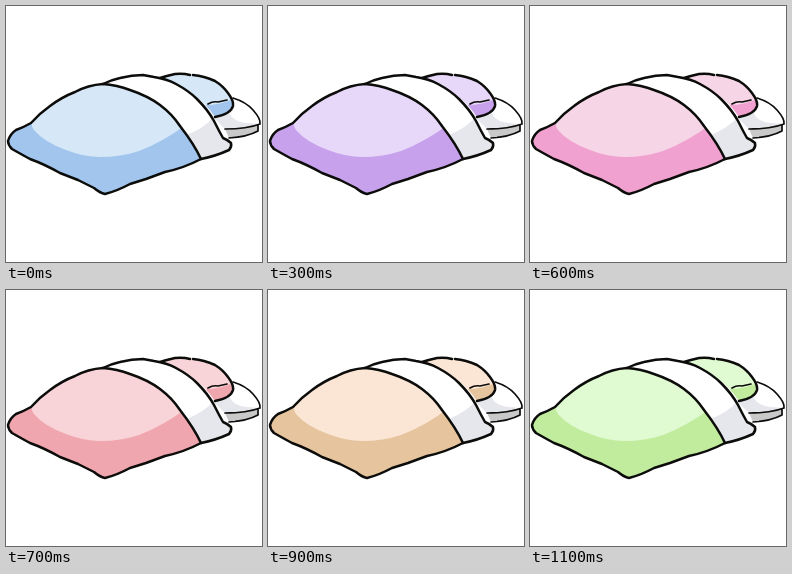
Animation of 256 by 256 pixels, one loop 1.2 s. Source, as an HTML page:

```html
<!DOCTYPE html>
<html lang="en">
<head>
<meta charset="utf-8">
<title>Colour-changing bedding</title>
<style>
html, body { margin: 0; width: 100%; height: 100%; overflow: hidden; background: #fff }
svg { display: block; width: 100%; height: 100% }
.light { fill: var(--light) }
.dark { fill: var(--dark) }
.shade { fill: #e6e7ed }
.ink { fill: none; stroke: #0c0c0a; stroke-width: 2.5; stroke-linecap: round; stroke-linejoin: round }
.thin { stroke-width: 1.7 }
</style>
</head>
<body>
<svg viewBox="0 0 256 256">
  <defs>
    <path id="quilt" d="M2 135Q4 128 10 124Q18 121 25 117Q34 107 44 100Q56 91 69 86Q82 79 97 78Q111 79 124 84Q142 90 154 99Q166 108 174 120Q188 138 195 153Q178 162 159 166L140 173L124 178Q111 185 99 188Q94 187 88 182L72 174L54 167Q38 158 24 153Q13 147 6 143Q2 139 2 135Z"/>
    <path id="band" d="M97 78Q105 74 114 72Q126 69 137 69L148 71Q161 73 170 78Q183 85 191 93Q202 104 208 115Q213 125 217 132Q222 134 225 137Q226 141 223 144Q210 150 195 153Q188 138 174 120Q166 108 154 99Q142 90 124 84Q111 79 97 78Z"/>
    <path id="roll" d="M152 72Q160 70 169 68Q177 67 184 69Q197 69 209 75Q217 80 222 87Q228 95 227 100Q225 108 209 111Q190 82 152 72Z"/>
    <clipPath id="inQuilt"><use href="#quilt"/></clipPath>
    <clipPath id="inBand"><use href="#band"/></clipPath>
    <clipPath id="inRoll"><use href="#roll"/></clipPath>
  </defs>

  <!-- mattress edge -->
  <path fill="#fff" d="M226 91Q241 96 249 107Q255 115 253 119Q240 123 219 123L208 112Z"/>
  <path class="shade" d="M224 107Q226 115 241 117L253 118Q240 123 219 123L208 112Z"/>
  <path fill="#c9c9c9" d="M219 123Q239 122 252 118V125Q241 131 223 132Z"/>
  <path class="ink thin" d="M227 92Q240 96 247 104Q255 113 254 118Q241 123 219 123M252 119V125Q241 131 223 132"/>

  <!-- turned-back corner -->
  <use href="#roll" class="light"/>
  <path class="dark" clip-path="url(#inRoll)" d="M198 99Q211 100 230 92V115H198Z"/>
  <path class="ink" d="M154 72Q160 70 169 68Q177 67 184 69M187 69Q198 70 209 75Q217 80 222 87Q228 95 227 100Q225 108 209 111"/>
  <path class="ink thin" d="M202 98Q207 95 212 96L221 94"/>

  <!-- quilt -->
  <use href="#quilt" class="dark"/>
  <path class="light" clip-path="url(#inQuilt)" d="M31 106Q22 116 28 124Q38 136 60 144Q78 151 94 151Q115 151 133 145Q159 135 182 117L160 85L97 70Z"/>

  <!-- cuff -->
  <use href="#band" fill="#fff"/>
  <path class="shade" clip-path="url(#inBand)" d="M181 129Q198 122 208 111L230 138L195 160Z"/>

  <!-- outlines -->
  <path class="ink" d="M97 78Q82 79 69 86Q56 91 44 100Q34 107 25 117Q18 121 10 124Q4 128 2 135Q2 139 6 143Q13 147 24 153Q38 158 54 167L72 174L88 182Q94 187 99 188Q111 185 124 178L140 173L159 166Q178 162 195 153"/>
  <path class="ink" d="M97 78Q105 74 114 72Q126 69 137 69L148 71Q161 73 170 78Q183 85 191 93Q202 104 208 115Q213 125 217 132Q222 134 225 137Q226 141 223 144Q210 150 195 153"/>
  <path class="ink" d="M97 78Q111 79 124 84Q142 90 154 99Q166 108 174 120Q188 138 195 153"/>
</svg>
<script>
// One row per 100 ms step: light, dark.
const palette = `
  d6e8f8 a1c5ed
  d5daf8 a3afe9
  ded8f8 b5a7ea
  e7d7f8 c7a1ec
  eed7f3 d9a1e5
  f2d6ed e5a1da
  f6d5e6 f0a1d0
  f8d4d9 f0a6ae
  fadcd6 ebb5a5
  fbe6d5 e6c49d
  f3f1d2 dcd898
  e0fbd1 c1eb9d`.trim().split("\n").map(row => row.trim().split(" "));
const style = document.documentElement.style;

function draw() {
  const step = Math.floor(performance.now() / 100) % palette.length;
  const [light, dark] = palette[step];
  style.setProperty("--light", "#" + light);
  style.setProperty("--dark", "#" + dark);
  requestAnimationFrame(draw);
}
draw();
</script>
</body>
</html>
```
